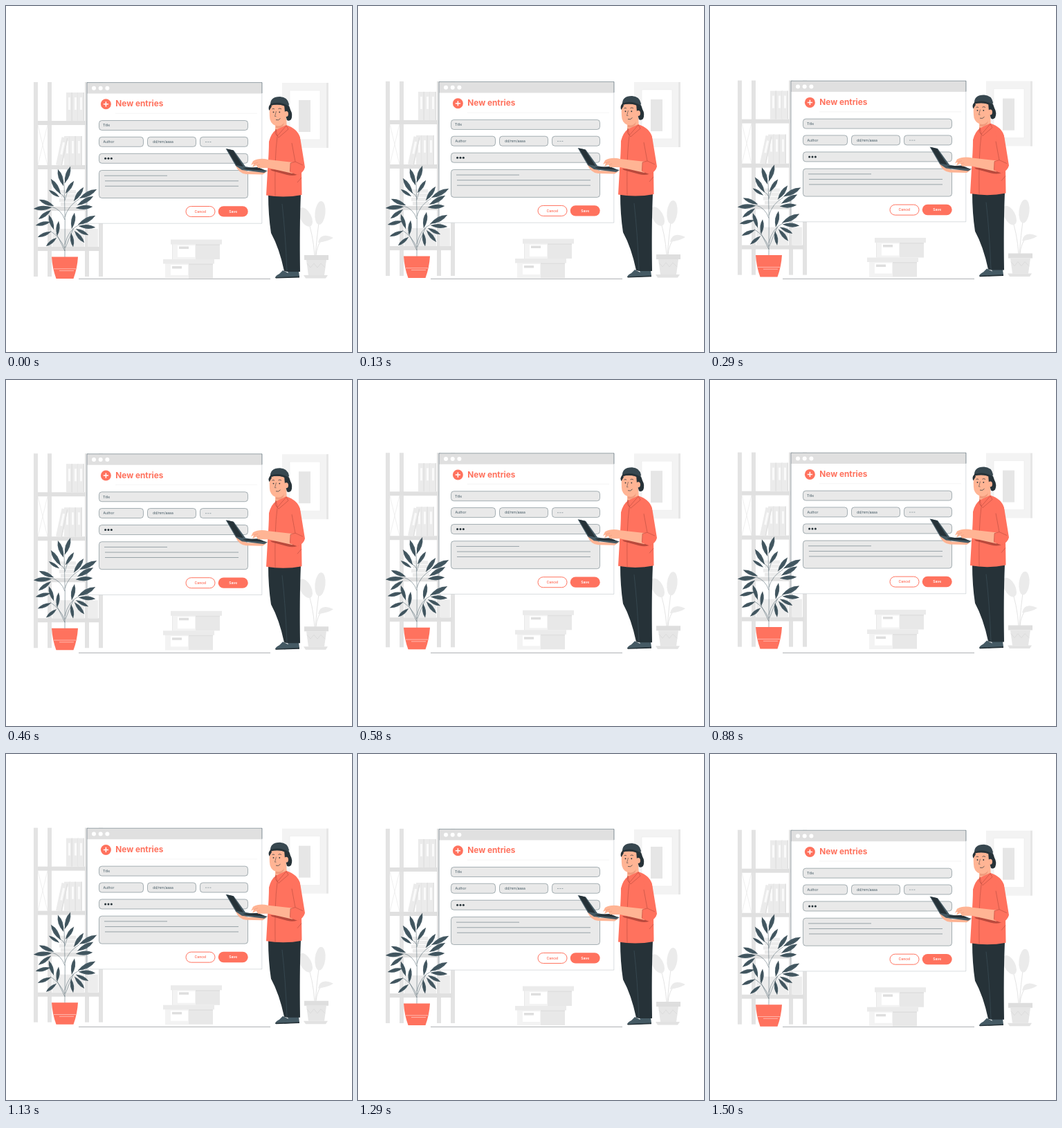
Write an HTML page that moves like this. It is 500 by 500 pixels and loops after 1540 ms.

```html
<!DOCTYPE html>
<html lang="en">
<head>
<meta charset="utf-8">
<style>
html, body { margin: 0; width: 100%; height: 100%; overflow: hidden; background: #fff; }
svg { display: block; width: 100vw; height: 100vh; }
text { font-family: Inter, sans-serif; font-size: 5px; fill: #455a64; }
.coral { fill: #ff725e; }
.dark { fill: #263238; }
.slate { fill: #455a64; }
.skin { fill: #ffb494; }
.line { fill: none; stroke: #455a64; stroke-width: .5; }
.field rect { fill: #e9e9e9; stroke: #455a64; stroke-width: .45; }
.label { font-weight: 600; text-anchor: middle; }
</style>
</head>
<body>
<svg viewBox="0 0 500 500">
  <path d="M105 394.3H382" stroke="#263238" stroke-width=".4"/>
  <g id="scene">
    <g id="shelf"></g>

    <g id="picture">
      <path fill="#f3f3f3" d="M399 111H463V205H399Z"/>
      <path fill="#e6e6e6" d="M463 111H466V205H463Z"/>
      <path fill="#fff" stroke="#ebebeb" stroke-width=".6" d="M410 122H454V193H410Z"/>
      <path fill="#e6e6e6" d="M423 136H440V182H423Z"/>
    </g>

    <g id="boxes">
      <path fill="#e8e8e8" d="M240 344H309V366H240Z M230 372H299V394H230Z"/>
      <path fill="#f3f3f3" d="M241 344H274V366H241Z M230 372H264V394H230Z"/>
      <path fill="#ebebeb" d="M238 337.5H312V344.5H238Z M227 366H301V372.5H227Z"/>
      <path fill="#e0e0e0" d="M274 344.5H309V346H274Z M264 372.5H299V374H264Z"/>
      <path fill="#fff" d="M248 346H273V363H248Z M238 374H263V389H238Z"/>
      <path fill="#dedede" d="M250 347.5H264V351H250Z M240 376H254V379.5H240Z"/>
    </g>

    <g id="palePlant" fill="#ebebeb">
      <path fill="none" stroke="#e4e4e4" d="M447 361Q449 335 453 305M446 361Q444 330 434 302M448 361Q449 345 459 334"/>
      <ellipse cx="454" cy="299" rx="7.5" ry="17" transform="rotate(6 454 299)"/>
      <ellipse cx="433" cy="305" rx="8" ry="15" transform="rotate(-28 433 305)"/>
      <path d="M451 342Q454 326 473 335Q466 340 451 342Z"/>
      <path fill="#dedede" d="M431 360H466V367H431Z"/>
      <path fill="#e6e6e6" d="M434 367H463L460 389H437Z"/>
      <path fill="#e2e2e2" d="M430 389H465L462 393.5H433Z"/>
      <path fill="none" stroke="#dcdcdc" d="M435 372L440 378L445 372L450 378L455 372L461 378"/>
    </g>

    <g id="window">
      <path fill="#fff" d="M117 110.5H370V314.5H117Z"/>
      <path fill="#e0e0e0" d="M117 110.5H370V126.5H117Z"/>
      <path class="line" stroke-opacity=".4" d="M117 314.2H369.8V110.5"/>
      <path class="line" d="M117 314V110.6H370V126"/>
      <g fill="#fff"><circle cx="127" cy="118.8" r="3"/><circle cx="136.7" cy="118.8" r="3"/><circle cx="146.4" cy="118.8" r="3"/></g>
      <circle class="coral" cx="144.4" cy="141.8" r="7.5"/>
      <path stroke="#fff" stroke-width="1.5" d="M140.8 141.8H148M144.4 138.2V145.4"/>
      <text class="coral" x="158.3" y="145.4" style="font-size:11.8px;font-weight:700">New entries</text>
      <path stroke="#efefef" stroke-width=".6" d="M158 155.2H363"/>
      <g class="field">
        <rect x="134.5" y="165.5" width="215" height="14" rx="4"/>
        <rect x="134.5" y="189.3" width="64" height="14" rx="4"/>
        <rect x="204.5" y="189.3" width="70" height="14" rx="4"/>
        <rect x="280.5" y="189.3" width="69" height="14" rx="4"/>
        <rect x="134.5" y="213.3" width="215" height="14" rx="4"/>
        <rect x="134.5" y="237.5" width="215" height="40" rx="4"/>
      </g>
      <text x="140" y="174.5">Title</text>
      <text x="140.5" y="198.2">Author</text>
      <text x="212" y="198.2">dd/mm/aaaa</text>
      <path class="line" stroke-dasharray="2 1.2" d="M288 196.5H297"/>
      <g class="dark"><circle cx="143.6" cy="220.3" r="1.5"/><circle cx="148" cy="220.3" r="1.5"/><circle cx="152.4" cy="220.3" r="1.5"/></g>
      <path class="line" d="M142 245.2H233M143 252.8H336M143 260.3H336"/>
      <rect x="260" y="289.5" width="42" height="15" rx="7.5" fill="#fff" stroke="#ff725e"/>
      <rect class="coral" x="306.7" y="289.2" width="43" height="15.4" rx="7.7"/>
      <text class="label coral" x="281" y="298.6">Cancel</text>
      <text class="label" x="328.2" y="298.6" style="fill:#fff">Save</text>
    </g>

    <g id="plant">
      <path class="line" d="M85 363Q86 310 84 254M85 309Q80 294 66 290M85 305Q90 288 106 279M85 278Q82 272 77 270M85 281Q87 272 90 267M85 350Q78 334 64 325M85 345Q90 323 106 316M85 354Q75 333 72 328M86 349Q95 326 98 321"/>
      <g id="leaves" class="slate"></g>
      <path class="coral" d="M66 362.5H104Q103 379 97.5 394H72.5Q67 379 66 362.5Z"/>
      <path stroke="#ffd5ce" stroke-width=".7" d="M69 379.8H101M77 382.6H98"/>
    </g>

    <g id="man">
      <path class="slate" d="M400 382L408 386V392L389 393Q389 390 395 387Z"/>
      <path class="slate" d="M407 383H423L424 391L402 393Q402 389 408 387Z"/>
      <path class="dark" d="M389 392.2L424 390.5V392.4L390 393.6Z"/>
      <path class="dark" d="M379 272H426Q424 320 425 384H406L402 383Q395 350 383 328Q379 302 379 272Z"/>
      <path fill="none" stroke="#455a64" stroke-width=".5" d="M399 286Q404 330 406 384"/>

      <path class="skin" d="M389 165L405 160L406 178L394 187L389 180Z"/>
      <path fill="#f09a7c" d="M390 172Q398 172 402 167L401 172Q397 178 390 176Z"/>
      <path class="dark" d="M402 139Q409 141 411 150Q415 157 412 164Q409 167 406 165L403 154Z"/>
      <path class="skin" d="M381.5 142H404V160Q403 173 393.5 173.5Q384 173 381.5 164Q380 155 381.5 142Z"/>
      <path class="dark" d="M382 142L384 145L380.5 151Q378 146 382 142ZM402 142L407 146L406 154H403Z"/>
      <ellipse class="skin" cx="405" cy="156" rx="3" ry="4"/>
      <path fill="#37474f" d="M382 144Q381 131 396 131Q407 131.5 409 142L407 147Q396 140 382 144Z"/>
      <path class="dark" d="M382 144V141.5Q396 137 408 144.5L407 147Q396 140 382 144Z"/>
      <path fill="none" stroke="#263238" stroke-width=".7" d="M384.5 149Q386 147.6 388 149M393.5 148.7Q396 147 398 149M390 164.5Q394 166 396.5 162.5"/>
      <path fill="none" stroke="#263238" stroke-width=".5" d="M390.5 152L388.5 159.5H390.5"/>
      <g class="dark"><circle cx="386.5" cy="153.3" r=".9"/><circle cx="395.3" cy="153.3" r=".9"/></g>

      <path class="coral" d="M390 179L405 172Q421 177 425 190L427 235L427.5 273Q402 278 376 273.5L378 238Q380 211 380 196Q383 184 390 179Z"/>
      <path fill="#b94a3d" d="M382 236L413 238L426 241Q418 247 406 244L384 238Z"/>
      <path fill="#ff725e" stroke="#a94438" stroke-width=".5" d="M390 178L392 188L405 173L408 178L394 190L389 184Z"/>
      <path fill="none" stroke="#a94438" stroke-width=".5" d="M392 189Q388 218 389 275M421 255L427 248"/>

      <path class="skin" d="M331.5 230L339 233L348 239L377 239.5L371 243.5L347 243Q336 242 331.5 230Z"/>
      <path class="slate" d="M317.5 206L329 208.5L346 232L378 238L373 241L341 237L332 231Z"/>
      <path class="dark" d="M319 206.5L328 208.6L343 232L333 230Z"/>
      <path class="dark" d="M342 234L364 233L376 238L347 236Z"/>
      <path class="skin" d="M415 226L379 222Q366 219 357 224L354 230L358 228L356 233L362 230L364 234L379 234L414 242Z"/>
      <path fill="none" stroke="#e99278" stroke-width=".5" d="M358 228L364 226M362 231L367 229"/>
      <path class="coral" d="M412 181Q423 181 425.5 193L432 233Q430 241 421 244L410 240L411 227L418 225Z"/>
      <path fill="none" stroke="#a94438" stroke-width=".5" d="M413 198L418 225L411 227L410.5 239M418 225L429 230"/>
    </g>
  </g>
</svg>
<script>
const $ = id => document.getElementById(id);
const rect = (x, y, w, h, fill) => `<rect x="${x}" y="${y}" width="${w}" height="${h}" fill="${fill}"/>`;

function book(x, y, w, h) {
  return rect(x, y, w, h, '#ebebeb') + rect(x + 3, y + 7, w - 6, 18, '#fafafa') +
    rect(x + w - 1.5, y, 1.5, h, '#e0e0e0');
}

function buildShelf() {
  let art = '<path stroke="#f0f0f0" d="M46 172L60 230M60 172L46 230"/>';
  for (const x of [40, 60, 114, 134]) art += rect(x, 110, 6, 281, '#e3e3e3');
  for (const y of [166, 230, 290, 348]) art += rect(46, y, 90, 6, '#e0e0e0');
  for (const x of [87, 96, 104]) art += book(x, 125, 9, 41);
  for (const x of [84, 92, 101]) art += book(x, 188, 9, 42);
  art += `<g transform="rotate(12 75 230)">${book(72, 189, 9, 41)}</g>`;
  for (let i = 0; i < 4; i++) art += rect(77 + i % 2 * 2, 266 + i * 6, 24, 5, '#ececec');
  art += rect(67, 322, 46, 26, '#ededed') + rect(118, 322, 15, 26, '#ededed');
  $('shelf').innerHTML = art;
}

// Pointed leaf between its base and its tip.
function leaf([x, y, tipX, tipY]) {
  const dx = tipX - x, dy = tipY - y, bend = 0.25;
  const side = s => `${x + dx * .55 - dy * bend * s} ${y + dy * .55 + dx * bend * s}`;
  return `<path d="M${x} ${y}Q${side(1)} ${tipX} ${tipY}Q${side(-1)} ${x} ${y}"/>` +
    `<path d="M${x} ${y}L${tipX} ${tipY}" stroke="#263238" stroke-width=".3"/>`;
}

const leaves = [
  [85, 256, 93, 232], [83, 260, 75, 236], [79, 272, 65, 250], [77, 276, 62, 266], [86, 271, 98, 253],
  [98, 282, 112, 262], [106, 278, 131, 265], [103, 288, 126, 275], [101, 292, 125, 290],
  [69, 289, 48, 280], [66, 291, 40, 293], [65, 295, 47, 308],
  [69, 323, 62, 302], [64, 312, 43, 317], [65, 326, 46, 334], [74, 332, 76, 311], [73, 335, 58, 347],
  [95, 322, 99, 299], [104, 316, 129, 303], [105, 318, 129, 320], [101, 322, 119, 331],
  [99, 325, 113, 342], [94, 328, 97, 348]
];

buildShelf();
$('leaves').innerHTML = leaves.map(leaf).join('');

const LOOP = 1540, RISE = 6.3;
function draw() {
  const phase = performance.now() % LOOP / LOOP;
  const lift = RISE * (1 - Math.abs(2 * phase - 1));
  $('scene').setAttribute('transform', `translate(0 ${-lift})`);
  requestAnimationFrame(draw);
}
draw();
</script>
</body>
</html>
```
